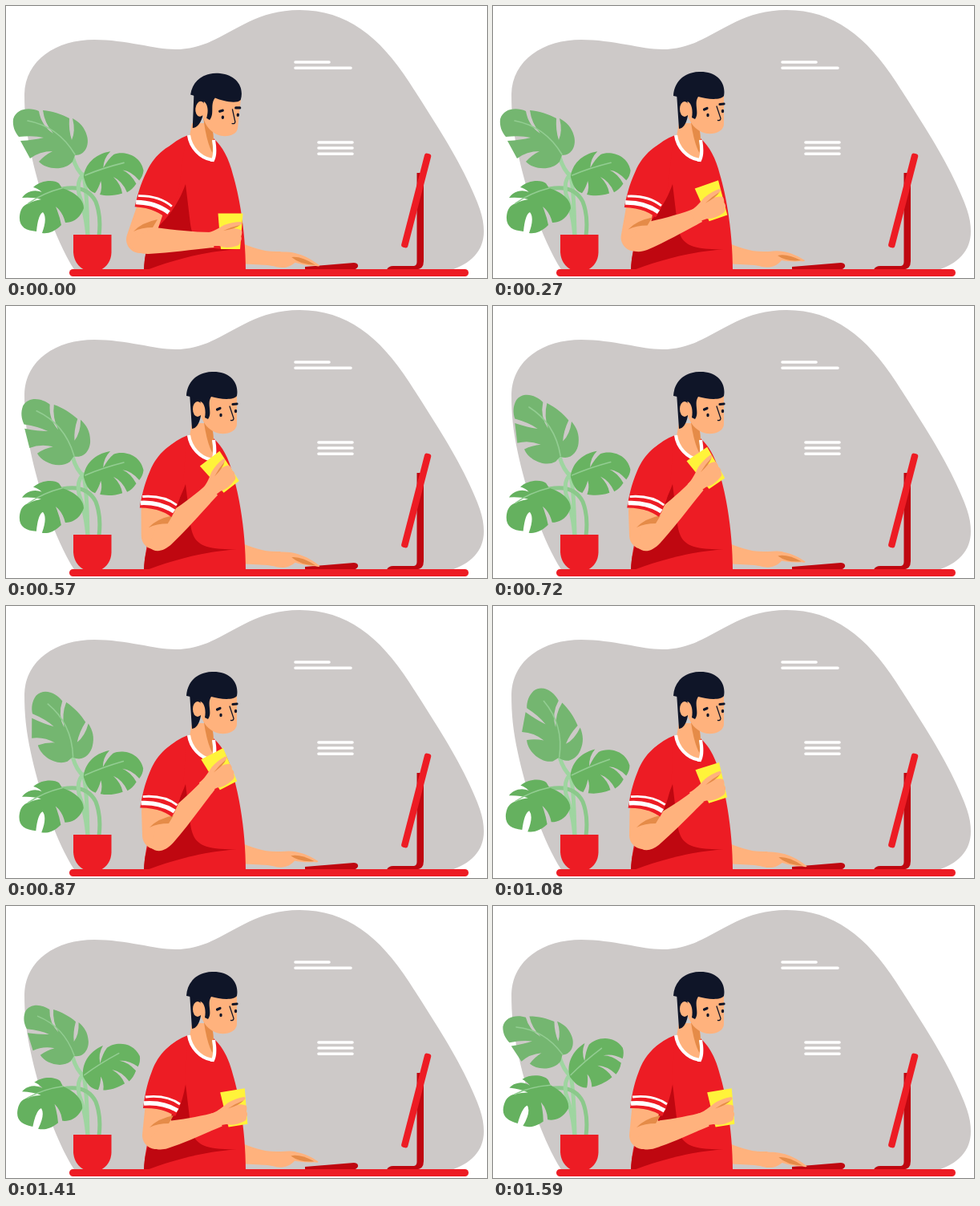
These frames come from a looping animation (600x339 px, 1740 ms). An HTML page:

```html
<!DOCTYPE html>
<html lang="en">
<head>
<meta charset="utf-8">
<title>Working at the desk</title>
<style>
  html, body { margin: 0; width: 100%; height: 100%; overflow: hidden; background: #fff; }
  svg { display: block; width: 600px; height: 339px; }
  .red { fill: #ed1c24; }
  .dark { fill: #bf0710; }
  .skin { fill: #ffb27d; }
  .shade { fill: #e58b48; }
  .navy { fill: #0f1528; }
  .line { fill: none; stroke-linecap: round; }
  .white { stroke: #fff; }
  .trim { stroke-linecap: butt; }
  .ink { stroke: #0f1528; }
  .stem { stroke: #9ed5a0; stroke-width: 5; }
  .far { stroke: #8bc98b; }
  .vein { stroke: #93cd92; stroke-width: 1.6; }
</style>
</head>
<body>
<svg viewBox="0 0 600 339">
  <path fill="#cdc9c8" d="M86 330C60 290 40 225 31 183C25 155 23 135 23 110C24 67 63 42 110 42C150 42 185 54 211 54C270 54 295 5 366 5C425 5 466 38 503 95C535 145 560 183 578 222C590 248 596 263 596 281C596 305 580 322 552 330Z"/>
  <path class="line white" stroke-width="3.6" d="M361 70H403M361 77.3H430M390 170H432M390 177H432M390 184.3H432"/>

  <path class="dark" d="M512.5 208H521V318Q521 328.5 511 328.5H475Q477 324 483 324H508Q512.5 324 512.5 319Z"/>
  <rect class="red" x="-4.2" y="-60.5" width="8.4" height="121" rx="3" transform="translate(511.7 242.5) rotate(14.5)"/>

  <path class="line stem" stroke-width="4" d="M83 188Q88 205 97 212Q101 230 102 286"/>
  <path class="line stem far" d="M70 228Q101 222 112 244Q119 262 116 286"/>
  <path class="line stem" d="M104 208Q87 210 91 234Q99 256 102 286"/>
  <g id="topLeaf">
    <path fill="#74b670" d="M86 186C100 186 104 172 101 162C98 151 92 145 83 140Q87 156 82 167Q78 155 79 140C70 135 58 131 46 130Q48 146 59 159Q44 149 41 131C30 126 13 127 9 141C8 150 11 157 16 163Q34 161 47 164Q35 167 18 168L30 190Q42 181 58 181Q48 186 41 194C50 204 73 206 83 194Z"/>
    <path class="line vein" d="M27 143Q65 150 86 185"/>
  </g>
  <g id="lowLeaf">
    <path fill="#65b15f" d="M70 227C86 232 97 241 97 252C92 266 82 270 74 270Q71 257 62 250Q67 262 69 273C60 282 52 284 45 283Q52 264 46 257Q40 260 38 281C24 280 16 275 17 262C18 252 22 248 30 245Q37 242 44 241Q34 238 20 239Q24 233 31 231Q38 229 45 232Q39 227 34 226C43 217 60 216 66 221Z"/>
    <path class="line vein" d="M28 246Q46 233 70 227"/>
  </g>
  <g id="rightLeaf">
    <path fill="#68b361" d="M97 213C99 198 112 185 132 183Q123 191 122 203Q129 192 136 187C147 183 169 188 172 209Q171 216 166 221Q157 209 146 207Q156 212 162 225Q157 232 150 235Q145 221 134 215Q143 225 144 236C133 239 123 238 116 236Q120 227 118 219Q115 228 110 234C101 230 99 222 97 213Z"/>
    <path class="line vein" d="M99 211Q122 203 148 198"/>
  </g>
  <path class="red" d="M84 285H131.5V307Q131 322 118 329H98Q85 322 84 307Z"/>

  <path class="dark" d="M373 325L434 320Q440 320.500 439 325Q437 328.500 432 328.500H373Z"/>
  <path class="skin" d="M290 294C308 301 322 307 342 306L352 316C345 326 338 325 326 323L290 321Z"/>
  <g id="hand">
    <path class="skin" d="M332 307C345 306 353 304 362 306C373 308 381 312 389 317Q389 319 384 318C374 319 366 318 360 317C354 324 346 328 332 324Z"/>
    <path class="shade" d="M355 311Q366 308 384 317Q366 319 355 311Z"/>
  </g>

  <path class="red" d="M227 161C206 169 191 184 184 206L184 270Q173 300 172 330H299C299 285 292 240 283 210C278 190 270 175 259 165Z"/>
  <path class="dark" d="M224 222C214 250 200 265 188 277Q172 302 172 330C200 320 240 306 288 303.500C245 303 234 298 230 272Z"/>
  <path class="skin" d="M232 146L257 146L259 166Q262 183 258 191C242 191 233 177 229 162Z"/>
  <path class="shade" d="M246 138L258 156Q260 170 257.500 183Q250 170 246 138Z"/>
  <path class="line white trim" stroke-width="4.200" d="M228 161C230 176 242 190 258 192Q262 184 259 167"/>

  <g id="head">
    <path class="navy" d="M229 108L232 153Q240 152 243 137L250 112Z"/>
    <path class="skin" d="M243 108H288V147C288 156 277 160 267 159C256 157 247 150 242 134Z"/>
    <path class="navy" d="M225 112C226 94 239 82 259 82C279 82 291 95 288 112C284 118 266 116 256 113C250 122 258 133 252 141L248 139C250 128 247 119 240 118Q232 113 225 112Z"/>
    <ellipse class="skin" cx="239" cy="128.500" rx="6" ry="9.500"/>
    <ellipse class="navy" cx="268" cy="136" rx="1.700" ry="2.200"/>
    <ellipse class="navy" cx="286.500" cy="131" rx="1.700" ry="2.200"/>
    <path class="line ink" stroke-width="3.200" d="M263.500 129L267 127.500M283 122.500L288 122"/>
    <path class="line ink" stroke-width="1.300" d="M279 125L284 140Q284 143 280.500 142.500"/>
  </g>

  <path id="upperArm" class="line" stroke="#ffb27d" stroke-width="34"/>
  <path id="foreArm" class="skin" d="M-16 0C-16 12 -8 17 4 17C30 16 55 12 76 10V-9C55 -9 35 -12 10 -16Z"/>
  <path id="crook" class="shade" d="M-8 -10Q2 -21 22 -25L16 -15Q2 -15 -8 -10Z"/>
  <g id="sleeve">
    <path class="red" d="M226 163C206 169 190 184 182 206C175 224 173 238 171 252Q195 251 211 262Q220 246 224 222Z"/>
    <path class="line white trim" stroke-width="2.800" d="M174 238Q200 235 217 247"/>
    <path class="line white trim" stroke-width="5.500" d="M172 246Q196 244 214 255"/>
  </g>
  <g id="cup">
    <path fill="#fff33a" d="M-15.500 -22.500H15.500L12 22H-12Z"/>
    <path class="skin" d="M-31 2C-23 1 -15 -4 -8 -8Q3 -12 13 -12Q16 -10 12 -8L2 -4Q10 -4 14 -1Q15 3 13 6Q15 10 12 13Q12 17 8 18Q-5 22 -14 18L-28 18Z"/>
    <path class="shade" d="M-9 -1Q2 -6 12 -8Q6 -3 -9 -1Z"/>
  </g>
  <rect class="red" x="79" y="328" width="498" height="9" rx="4.500"/>
</svg>
<script>
const LOOP = 1740, STEP = 30, HOLD = 60, END = 1590;
const el = id => document.getElementById(id);
const place = (id, transform) => el(id).setAttribute("transform", transform);
const ramp = (t, from, to) => Math.min(1, Math.max(0, (t - from) / (to - from)));
const easeOut = u => Math.sin(u * Math.PI / 2);

function drawPlant(t) {
  const swing = 40 * ramp(t, 270, 1100) - 45 * ramp(t, 1100, END);
  const size = 1 - .08 * ramp(t, 1080, 1260);
  const droop = (t / END) ** 4;
  place("topLeaf", `translate(${86 - .1 * swing} ${186 + .08 * swing}) rotate(${swing}) scale(${size}) translate(-86 -186)`);
  place("rightLeaf", `rotate(${-3 - 23 * droop} 97 215)`);
  place("lowLeaf", `rotate(${10 * droop} 92 235)`);
}

// The cup is lifted, turned and lowered; the arm follows it.
function drawArm(t) {
  const lift = easeOut(ramp(t, HOLD, 720));
  const lower = ramp(t, 800, 1260) ** 2;
  const tilt = -40 * lift + 31 * ramp(t, 600, 1260);
  const cupX = 280 - 13 * lift + 19 * lower, cupY = 281 - 78 * lift + 49 * lower;
  const elbowX = 167 + 20 * lift, elbowY = 291 - 5 * lift;
  const sleeve = 11 - 7 * lift - 4 * lower;

  const a = tilt * Math.PI / 180, cos = Math.cos(a), sin = Math.sin(a);
  const rootX = elbowX + 6, rootY = elbowY + 1;
  const dx = cupX - 23 * cos - 10 * sin - rootX;
  const dy = cupY - 23 * sin + 10 * cos - rootY;
  const turn = Math.atan2(dy, dx) * 180 / Math.PI;

  place("sleeve", `translate(${-sleeve / 2} 0) rotate(${sleeve / 2} 186 200)`);
  el("upperArm").setAttribute("d", `M${190 - sleeve} 256L${elbowX} ${elbowY}`);
  place("foreArm", `translate(${rootX} ${rootY}) rotate(${turn}) scale(${Math.hypot(dx, dy) / 74} 1)`);
  place("crook", `translate(${elbowX} ${elbowY})`);
  place("cup", `translate(${cupX} ${cupY}) rotate(${tilt})`);
}

function draw(t) {
  drawPlant(t);
  drawArm(t);
  const tap = (1 - Math.cos((t - 270) / 530 * 2 * Math.PI)) / 2;
  place("hand", `translate(340 314) rotate(${8 * tap}) scale(${1 + .07 * tap} 1) translate(-340 -314)`);
  place("head", `rotate(${6 - 6 * easeOut(ramp(t, HOLD, 240))} 243 160)`);
}

const start = performance.now();
function frame() {
  const t = (performance.now() - start) % LOOP;
  draw(t < HOLD + STEP ? HOLD : Math.min(END, Math.floor(t / STEP) * STEP));
  requestAnimationFrame(frame);
}
frame();
</script>
</body>
</html>
```
